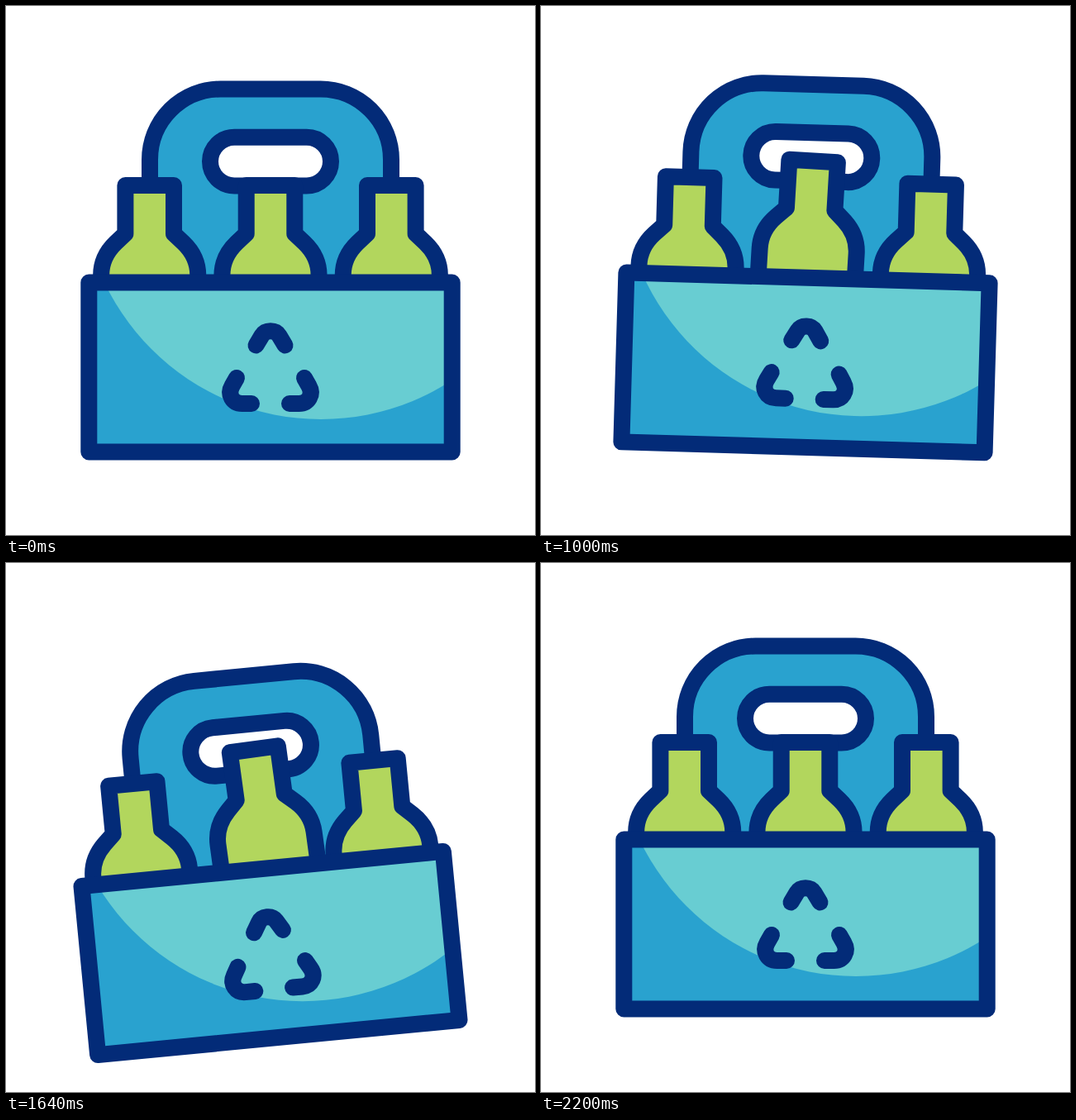
Write an HTML page that moves like this. It is 640 by 640 pixels and loops after 2400 ms.

```html
<!DOCTYPE html>
<html lang="en">
<head>
<meta charset="utf-8">
<title>Bottle carrier</title>
<style>
  html, body { margin: 0; width: 100%; height: 100%; overflow: hidden; background: #fff; }
  svg { display: block; width: 100%; height: 100%; }
  .line { stroke: #032b78; stroke-width: 20; stroke-linecap: round; stroke-linejoin: round; }
  .blue { fill: #29a2cf; }
  .teal { fill: #68cdd2; }
  .green { fill: #b2d65d; }
  .white { fill: #fff; }
  .none { fill: none; }
</style>
</head>
<body>
<svg viewBox="0 0 640 640">
  <defs>
    <path id="bottle" class="line green" d="M-29.3 217 H29.3 V275.5 L41 286.5 C52 297 58.6 311 58.6 326 V470 H-58.6 V326 C-58.6 311 -52 297 -41 286.5 L-29.3 275.5 Z"/>
    <path id="arrow" class="line none" d="M279 450 L273.6 459.5 C267.5 470 274 481 285.5 481 H297"/>
    <clipPath id="front"><rect x="100.3" y="334.5" width="439.4" height="205"/></clipPath>
  </defs>
  <g id="carrier">
    <path class="line blue" d="M174 345 V186 A85.5 85.5 0 0 1 259.5 100.5 H380.5 A85.5 85.5 0 0 1 466 186 V345 Z"/>
    <rect class="line white" x="247" y="158.8" width="146" height="58.6" rx="29.3"/>
    <use href="#bottle" x="173.7"/>
    <use href="#bottle" x="466.3"/>
    <g id="loose"><use href="#bottle" x="320"/></g>
    <rect class="blue" x="100.3" y="334.5" width="439.4" height="205"/>
    <circle class="teal" cx="381" cy="210" r="290" clip-path="url(#front)"/>
    <rect class="line none" x="100.3" y="334.5" width="439.4" height="205"/>
    <path class="line none" d="M302.5 410.5 L309.6 398.6 C314 391.3 326 391.3 330.4 398.6 L337.5 410.5"/>
    <use href="#arrow"/>
    <use href="#arrow" transform="translate(640 0) scale(-1 1)"/>
  </g>
</svg>
<script>
  const LOOP = 2400;
  const carrier = document.getElementById("carrier");
  const loose = document.getElementById("loose");

  // Each track is a list of [time in ms, value]; the tilt trails the hop.
  const hop = [[200, 0], [700, 36], [1200, -28], [1700, 37.5], [2100, 0]];
  const tilt = [[200, 0], [800, -4], [1300, 12], [1800, -11], [2200, 0]];
  const swing = [[200, 0], [800, 8], [1400, -16], [1900, 13], [2200, 0]];
  const lift = [[200, 0], [800, 30], [1400, 7], [1900, 50.5], [2200, 0]];
  const slide = [[1400, 0], [1900, 14.5], [2200, 0]];

  const ease = u => u * u * (3 - 2 * u);

  function at(track, t) {
    if (t <= track[0][0]) return track[0][1];
    for (let i = 1; i < track.length; i++) {
      const [t0, a] = track[i - 1], [t1, b] = track[i];
      if (t < t1) return a + (b - a) * ease((t - t0) / (t1 - t0));
    }
    return track[track.length - 1][1];
  }

  function pose(node, x, y, angle, pivotY) {
    node.setAttribute("transform", `translate(${x} ${y}) rotate(${angle} 320 ${pivotY})`);
  }

  const start = performance.now();

  function draw() {
    const t = (performance.now() - start) % LOOP;
    pose(carrier, 0, at(hop, t), at(tilt, t), 437);
    pose(loose, at(slide, t), -at(lift, t), at(swing, t), 300);
    requestAnimationFrame(draw);
  }
  draw();
</script>
</body>
</html>
```
